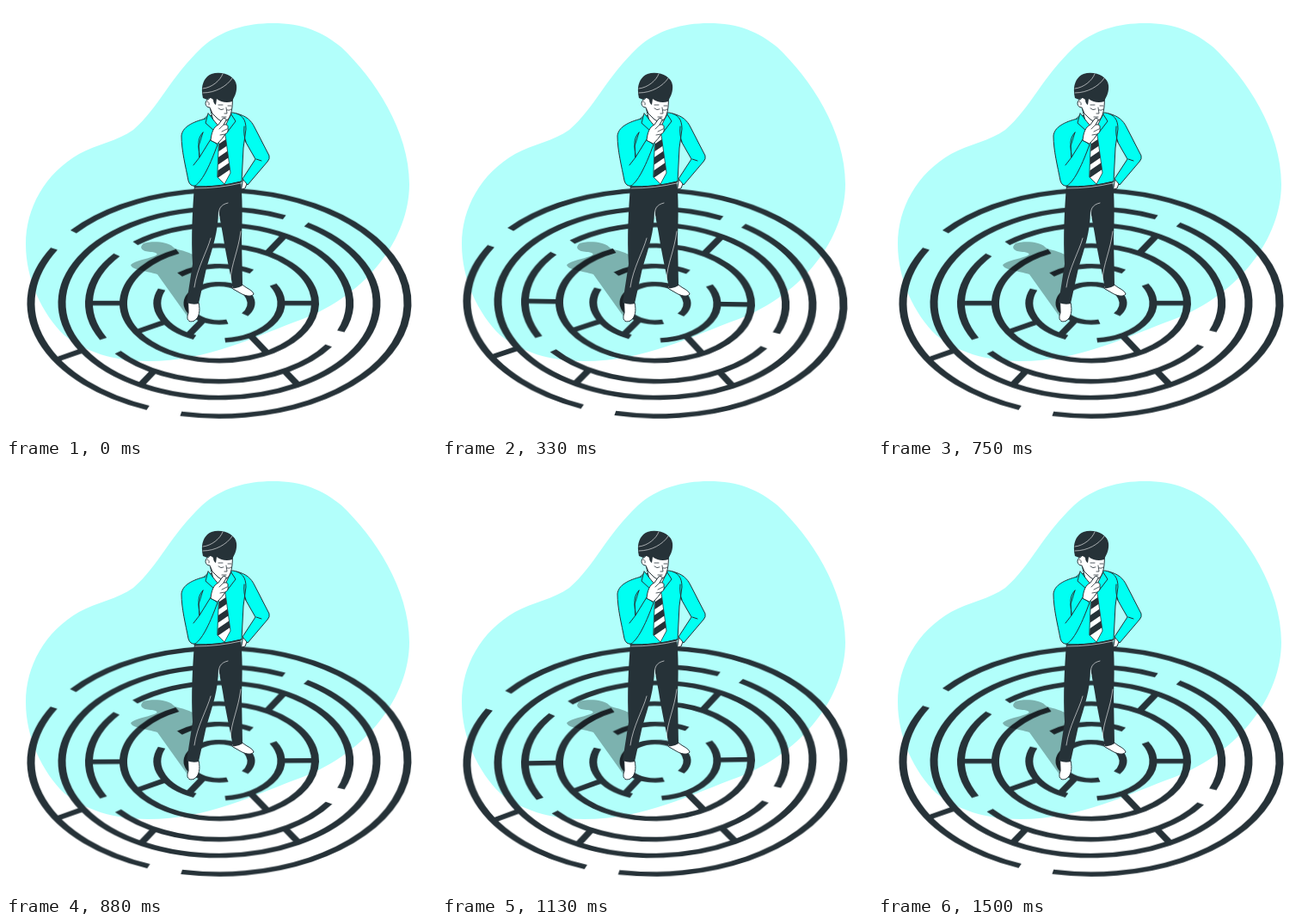
An HTML page for the animation above (1.54 s loop, 500 by 500 pixels).

```html
<!DOCTYPE html>
<html lang="en">
<head>
<meta charset="utf-8">
<title>Maze</title>
<style>
  html, body { margin: 0; width: 100%; height: 100%; overflow: hidden; background: #fff; }
  svg { display: block; width: 100%; height: 100%; }
  #maze { transform-origin: 248px 345.5px; fill: none; stroke: #263238; stroke-width: 9; }
  .ink { fill: #263238; }
  .skin, .shirt, .line { stroke: #263238; stroke-linejoin: round; stroke-linecap: round; }
  .skin { fill: #fff; }
  .shirt { fill: #00fff2; }
  .line { fill: none; }
  .light { fill: none; stroke: #fff; stroke-width: .6; stroke-linecap: round; }
</style>
</head>
<body>
<svg viewBox="0 0 500 500">
  <defs>
    <clipPath id="tieClip"><path id="tie" d="M248 151 L255 150 L261 194 L254 207 L246 199 Z"/></clipPath>
  </defs>

  <path id="blob" fill="#b2fffb" d="M310 20 C345 20 368 30 390 48 C428 84 469 145 469 207 C469 270 420 335 345 364
    C290 384 235 413 165 413 C125 413 92 402 68 383 C42 358 23 318 23 277 C23 235 45 195 85 172
    C105 161 130 157 148 144 C178 118 190 84 228 48 C250 28 280 20 310 20 Z"/>

  <g id="maze"><g id="rings" transform="translate(248 345.5) scale(1 .6)"></g></g>

  <path id="shadow" opacity=".3" d="M160 276 C170 273 188 274 194 280 C197 284 206 283 217 289 L217 352 L211 361
    L176 312 C164 308 146 307 145 301 C150 296 164 294 172 291 C178 289 176 287 170 286 C160 286 153 282 160 276 Z"/>

  <g id="shoes" class="skin">
    <path d="M212 344 L224 345 C226 354 225 362 219 366 C212 369 209 364 212 357 Z"/>
    <path d="M263 326 L274 323 C278 328 287 330 288 335 C285 339 277 337 271 333 L264 329 Z"/>
  </g>

  <g id="trousers">
    <path class="ink" d="M219 209 L273 203 C275 222 275 245 274 270 L275 325 Q269 329 264 328 C260 307 255 286 252 265
      L247 238 C247 262 240 282 233 305 L224 346 Q218 348 210 345 L217 300 C215 270 217 235 219 209 Z"/>
    <path class="light" d="M248 246 C246 237 249 231 258 229 M238 270 C234 285 222 305 219 327
      M273 262 C270 285 262 300 261 318 M220 212 Q247 212 273 206"/>
  </g>

  <g id="shirt">
    <path class="skin" d="M276 201 L281 204 L278 212 L274 213 Z"/>
    <path class="shirt" d="M268 125 C280 128 285 133 289 141 L306 174 Q307 178 304 181 L281 208 L275 201 L290 178 L278 157 Z"/>
    <path class="shirt" d="M234 128 L264 124 C274 126 279 131 279 143 L276 165 L274 204 Q246 211 219 210 L218 180 L220 142 Z"/>
    <path class="skin" d="M238 120 L259 127 L262 134 L253 150 L243 141 Z"/>
    <g clip-path="url(#tieClip)">
      <path fill="#fff" d="M240 145 H265 V210 H240 Z"/>
      <path stroke="#263238" stroke-width="7" d="M240 170 l26 -18 m-26 33 l26 -18 m-26 33 l26 -18"/>
    </g>
    <use href="#tie" class="line" stroke-width=".8"/>
    <path class="shirt" d="M235 125 L232 136 L243 146 L246 139 Z M262 126 L267 134 L257 147 L255 140 Z"/>
    <path class="line" d="M277 140 Q276 151 279 158 M291 178 L297 180 M219 210 Q247 211 274 204"/>
    <path class="shirt" d="M232 131 C216 135 205 141 204 151 C204 168 209 187 212 203 Q214 210 220 209
      C229 203 238 183 246 161 L238 155 L225 176 L224 163 L229 147"/>
    <path class="line" d="M229 147 Q223 153 224 163 L225 176 L218 185"/>
  </g>

  <g id="head">
    <path class="skin" d="M236 101 L263 102 C264 114 263 126 258 132 Q253 136 247 132 L240 125 L237 118
      C231 118 230 110 236 108 Z"/>
    <path class="line" stroke-width=".8" d="M247 119 Q250 122 253 120 M257 121 Q260 122 262 120 M247 115 L252 115
      M258 116 L262 116 M256 118 L257 125 L254 125 M251 129 L256 129 M234 111 Q237 112 236 115"/>
    <path class="ink" d="M229 107 C226 95 229 83 239 79 C252 75 267 82 268 92 C269 101 265 106 263 111
      C257 113 250 112 245 108 L244 115 Q241 113 241 109 Q237 105 234 109 Z"/>
    <path class="light" d="M229 101 C244 101 257 93 263 84 M229 96 C239 95 249 87 252 79"/>
  </g>

  <g id="hand">
    <path class="skin" d="M238 156 C239 147 241 141 247 138 L252 131 Q256 129 256 133 L253 138 Q259 137 258 142
      Q259 147 255 149 Q252 154 246 160 Z"/>
    <path class="line" stroke-width=".8" d="M253 138 L248 143 M257 143 L251 146 M255 149 L249 150"/>
  </g>
</svg>

<script>
  // Each wall is a circle with gaps of one length; spokes join it to the next wall in
  const walls = [
    { r: 219, gap: 40, gaps: [107, 214], spokes: [150] },
    { r: 183, gap: 29, gaps: [299], spokes: [60, 120] },
    { r: 151.5, gap: 31, gaps: [27, 147, 224], spokes: [180, 300] },
    { r: 111.5, gap: 30, gaps: [252], spokes: [0, 60, 150] },
    { r: 72, gap: 36, gaps: [99, 216, 316], spokes: [120] },
    { r: 37, gap: 25, gaps: [56], spokes: [] }
  ];

  const polar = (r, deg) => {
    const a = deg * Math.PI / 180;
    return `${r * Math.cos(a)} ${r * Math.sin(a)}`;
  };
  const arc = (r, from, to) =>
    `M${polar(r, from)} A${r} ${r} 0 ${+(to - from > 180)} 1 ${polar(r, to)}`;

  let d = '';
  walls.forEach(({ r, gap, gaps, spokes }, i) => {
    const half = gap / r * 90 / Math.PI;
    gaps.forEach((at, k) => {
      const next = gaps[k + 1] ?? gaps[0] + 360;
      d += arc(r, at + half, next - half);
    });
    for (const deg of spokes) d += `M${polar(r, deg)} L${polar(walls[i + 1].r, deg)}`;
  });
  const path = document.createElementNS('http://www.w3.org/2000/svg', 'path');
  path.setAttribute('d', d);
  document.getElementById('rings').append(path);

  // Linear sway between +1 and -1 degree, held at 24 steps a second
  const loop = 1540, cycle = 36;
  const sway = p => p < .25 ? 4 * p : p < .75 ? 2 - 4 * p : 4 * p - 4;
  const steps = Array.from({ length: cycle + 1 }, (_, i) => ({
    offset: Math.round(i * 100 / 24) * 10 / loop,
    transform: `rotate(${sway(i / cycle)}deg)`,
    easing: 'steps(1, end)'
  }));
  steps.push({ offset: 1, transform: 'rotate(0deg)' });
  document.getElementById('maze').animate(steps, { duration: loop, iterations: Infinity });
</script>
</body>
</html>
```
